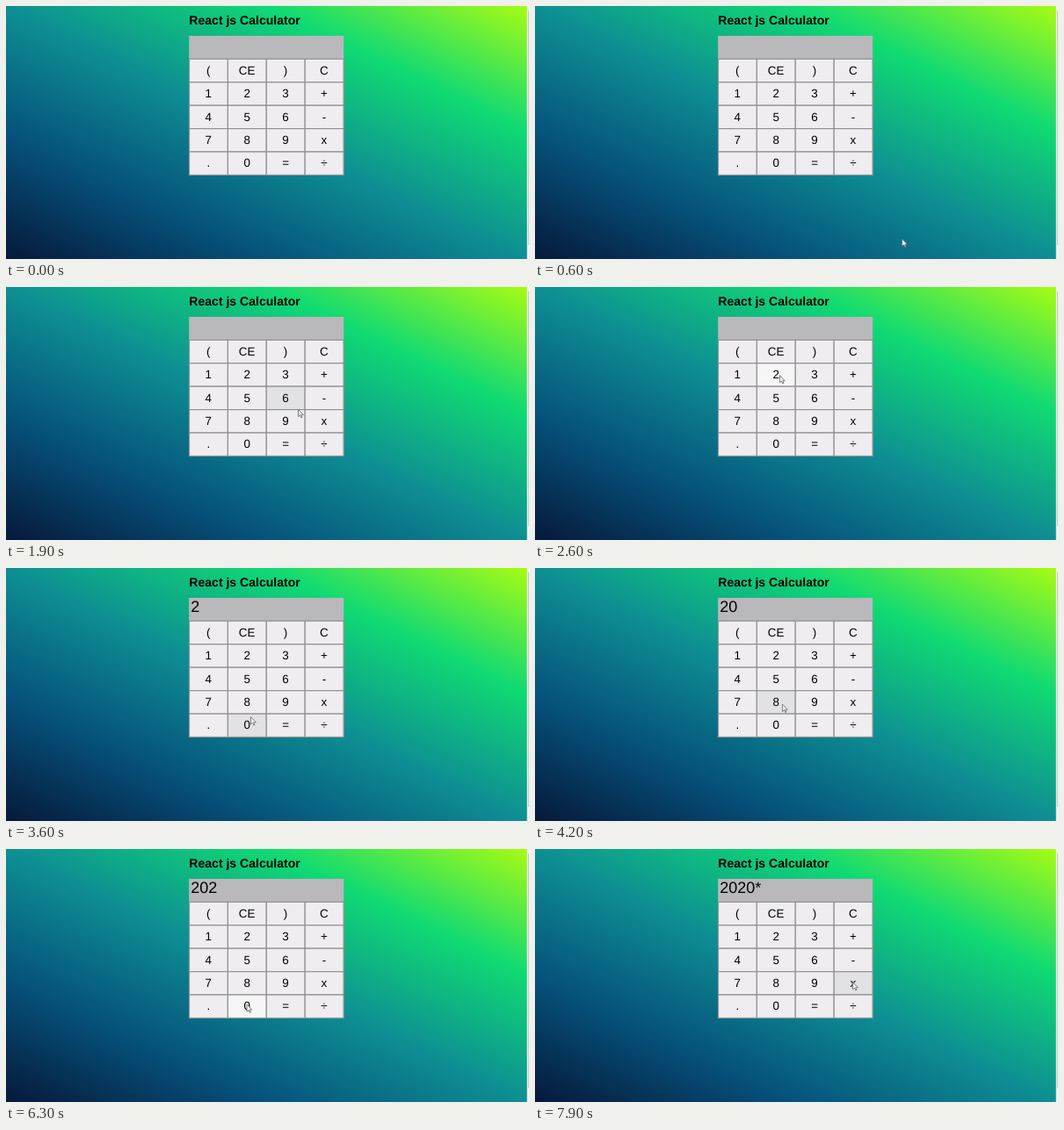
An HTML page that plays this animation: 595 by 288 pixels, repeating every 8 s.

```html
<!DOCTYPE html>
<html lang="en">
<head>
<meta charset="utf-8">
<title>Calculator</title>
<style>
  html, body { margin: 0; width: 100%; height: 100%; overflow: hidden; }
  body { background: linear-gradient(to top right, #06193a, #06527b, #0e8f93, #10da73, #a8fc12); }
  svg { display: block; width: 595px; height: 288px; font: 13.4px "Liberation Sans", Arial, sans-serif; text-rendering: geometricPrecision; }
  .title { font-size: 14.05px; font-weight: bold; }
  .display { font-size: 18px; }
  .key { fill: #efedef; stroke: #929194; stroke-width: 1.2; }
  .key.hover { fill: #e2e1e4; }
  .key.pressed { fill: #f7f6f7; }
  .label { text-anchor: middle; }
</style>
</head>
<body>
<svg viewBox="0 0 595 288">
  <rect x="592.7" width="2.3" height="288" fill="#f1f1f1"/>
  <rect x="594" y="5" width="1" height="267" fill="#c6c7c7"/>
  <text class="title" x="208.3" y="21">React js Calculator</text>
  <rect x="208.2" y="34" width="176" height="26.5" fill="#b9b8ba"/>
  <text class="display" x="210.3" y="50"></text>
  <g id="keys"></g>
  <path id="cursor" d="M0 0V8.4L2 6.6L3.2 9.4L4.5 8.9L3.3 6.2H5.8Z" fill="#f2f2f2" stroke="#666" stroke-width=".8"/>
</svg>
<script>
const LOOP = 8000, STEP = 100;
const LEFT = 208.5, TOP = 60.4, KEY_W = 43.9, KEY_H = 26.4;
const LABELS = "( CE ) C 1 2 3 + 4 5 6 - 7 8 9 x . 0 = ÷".split(" ");
const TYPED = "2020*";
// The pointer leaves one stop every BEAT, travels for MOVE, and from
// the third stop on presses the key just before it leaves.
const FIRST = 400, BEAT = 1200, MOVE = 700, PRESS = 200;
const STOPS = [[430, 290], [367.5, 164.5], [278.5, 100.5], [278.5, 169.5],
  [293.7, 96.5], [274, 176.8], [361.5, 151.5]];

const svgNode = (tag, attrs, text = "") => {
  const node = document.createElementNS("http://www.w3.org/2000/svg", tag);
  for (const name in attrs) node.setAttribute(name, attrs[name]);
  node.textContent = text;
  return document.getElementById("keys").appendChild(node);
};

const keys = LABELS.map((label, i) => {
  const x = LEFT + i % 4 * KEY_W, y = TOP + Math.floor(i / 4) * KEY_H;
  const key = svgNode("rect", { class: "key", x, y, width: KEY_W, height: KEY_H });
  svgNode("text", { class: "label", x: x + KEY_W / 2 - .2, y: y + 17.4 }, label);
  return key;
});

const display = document.querySelector(".display");
const cursor = document.getElementById("cursor");
const clamp = (v, max) => Math.max(0, Math.min(max, v));

function draw(now) {
  const t = Math.floor(now % LOOP / STEP) * STEP;
  const beats = Math.floor((t - FIRST) / BEAT);
  const sinceBeat = t - FIRST - beats * BEAT;

  const last = STOPS.length - 1;
  const from = STOPS[clamp(beats, last)], to = STOPS[clamp(beats + 1, last)];
  const p = clamp(sinceBeat / MOVE, 1), ease = p * p * (3 - 2 * p);
  const [x, y] = from.map((v, i) => v + (to[i] - v) * ease);

  const col = Math.floor((x - LEFT) / KEY_W), row = Math.floor((y - TOP) / KEY_H);
  const hovered = col >= 0 && col < 4 ? row * 4 + col : -1;
  const pressed = beats > 0 && beats < last && sinceBeat >= BEAT - PRESS;
  keys.forEach((key, i) => key.setAttribute("class",
    i !== hovered ? "key" : pressed ? "key pressed" : "key hover"));
  display.textContent = TYPED.slice(0, Math.max(0, beats - 1));
  cursor.setAttribute("transform", `translate(${x} ${y})`);
}

const startTime = performance.now();
(function tick() {
  draw(performance.now() - startTime);
  requestAnimationFrame(tick);
})();
</script>
</body>
</html>
```
